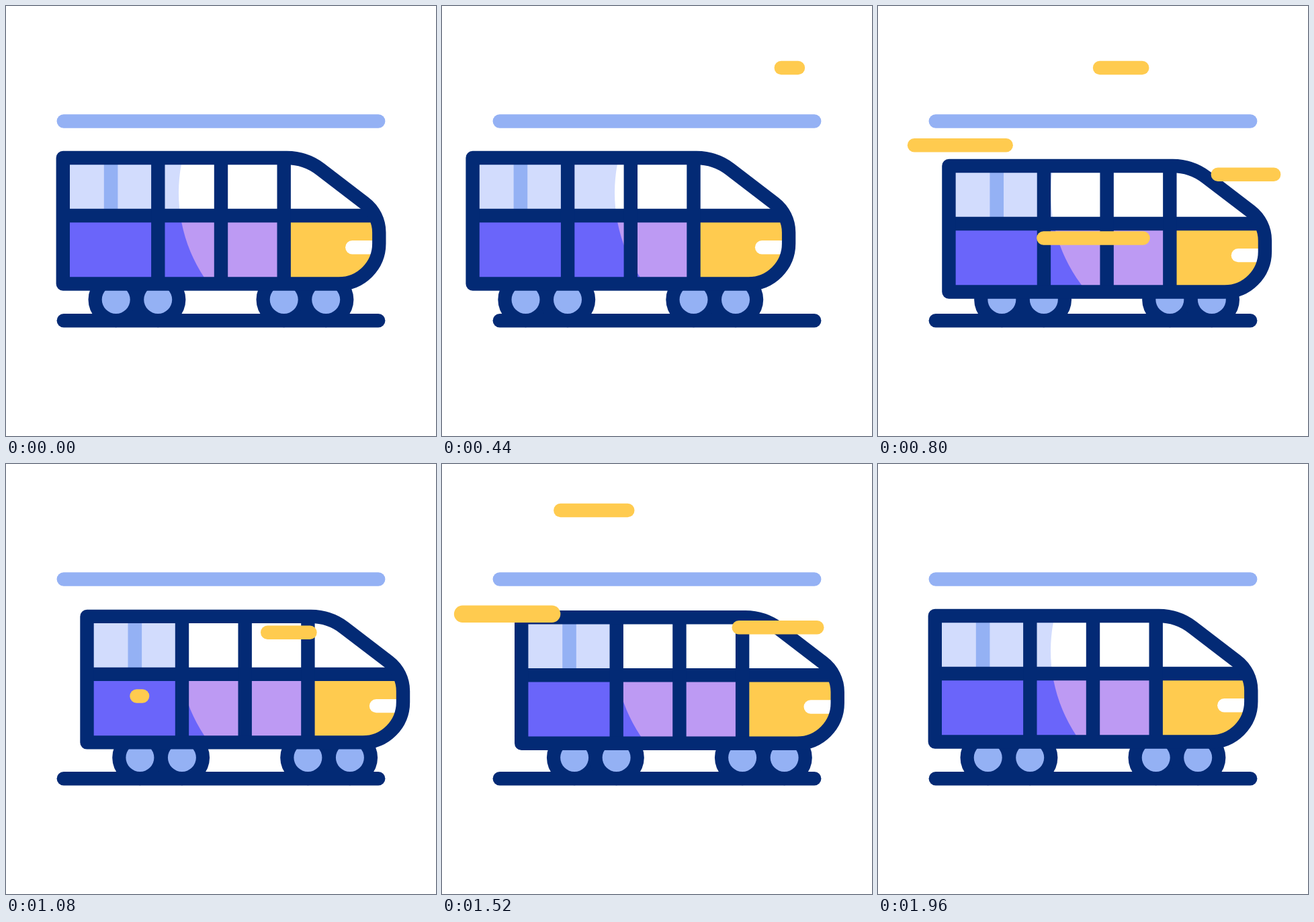
An HTML page with a canvas for the animation above (2 s loop, 640 by 640 pixels).

```html
<!DOCTYPE html>
<html lang="en">
<head>
<meta charset="utf-8">
<title>Train</title>
<style>
  html, body { margin: 0; width: 100%; height: 100%; overflow: hidden; background: #fff; }
  canvas { display: block; width: 640px; height: 640px; }
</style>
</head>
<body>
<canvas id="stage" width="640" height="640"></canvas>
<script>
const ctx = document.getElementById('stage').getContext('2d');
const NAVY = '#032a75', BLUE = '#94b1f4', PALE = '#d2dcfd', VIOLET = '#6a65fa',
      LILAC = '#bd9af3', GOLD = '#ffcb4f', WHITE = '#ffffff';
const LOOP = 2000, STEP = 40, STROKE = 20.4;

// start time, right end, y, length, line width
const streaks = [
  [360, 530, 92, 200, STROKE],
  [440, 254, 207.3, 200, STROKE],
  [560, 394.5, 345.5, 200, STROKE],
  [640, 589.2, 250.7, 200, STROKE],
  [1120, 376.3, 69, 200, STROKE],
  [1160, 225, 223.3, 194.3, 25.6],
  [1320, 558.3, 243.2, 200, STROKE]
];

function ease(t, from, to) {
  const u = Math.min(1, Math.max(0, (t - from) / (to - from)));
  return u * u * (3 - 2 * u);
}

function slide(t) {
  return -40.3 * ease(t, 0, 400) + 76 * ease(t, 400, 960) - 35.7 * ease(t, 1440, 1960);
}

// two dips of the car body on its springs
function dip(t) {
  const start = 472, period = 562, half = period / 2;
  if (t < start || t > start + 2 * period) return 0;
  const p = (t - start) % period;
  return 12.9 * (p < half ? ease(p, 0, half) : 1 - ease(p, half, period));
}

function line(x1, y1, x2, y2, color, width = STROKE, cap = 'round') {
  ctx.beginPath();
  ctx.moveTo(x1, y1);
  ctx.lineTo(x2, y2);
  ctx.strokeStyle = color;
  ctx.lineWidth = width;
  ctx.lineCap = cap;
  ctx.stroke();
}

function rect(x, y, w, h, color) {
  ctx.fillStyle = color;
  ctx.fillRect(x, y, w, h);
}

function disc(x, y, r, color) {
  ctx.beginPath();
  ctx.arc(x, y, r, 0, 2 * Math.PI);
  ctx.fillStyle = color;
  ctx.fill();
}

function hull() {
  const p = new Path2D();
  p.moveTo(84.8, 226);
  p.lineTo(418, 226);
  p.arc(418, 308, 82, -Math.PI / 2, -0.918);
  p.arc(500.3, 337, 55, -0.918, 0);
  p.lineTo(555.3, 353.5);
  p.arc(495.3, 353.5, 60, 0, Math.PI / 2);
  p.lineTo(84.8, 413.5);
  p.closePath();
  return p;
}
const body = hull();

function drawWheels(dx) {
  const xs = [163.7, 226.2, 413.7, 476.2];
  xs.forEach(x => disc(x + dx, 437, 41.2, NAVY));
  xs.forEach(x => disc(x + dx, 437, 21, BLUE));
}

function drawBody(dx, dy) {
  ctx.save();
  ctx.translate(dx, dy);
  ctx.save();
  ctx.clip(body);
  rect(84, 226, 480, 86, PALE);
  rect(84, 312, 480, 102, VIOLET);

  // the lit area stays fixed on the stage
  ctx.save();
  ctx.beginPath();
  ctx.arc(485 - dx, 278 - dy, 228, 0, 2 * Math.PI);
  ctx.clip();
  rect(84, 226, 480, 86, WHITE);
  rect(84, 312, 480, 102, LILAC);
  ctx.restore();

  rect(145.8, 226, 20.6, 86, BLUE);
  rect(414, 226, 150, 86, WHITE);
  rect(414, 312, 150, 102, GOLD);
  line(515.3, 359.2, 560, 359.2, WHITE);
  line(84.8, 312, 548, 312, NAVY, STROKE, 'butt');
  [226.3, 320, 413.7].forEach(x => line(x, 226, x, 413.5, NAVY, STROKE, 'butt'));
  ctx.restore();

  ctx.strokeStyle = NAVY;
  ctx.lineWidth = STROKE;
  ctx.lineJoin = 'round';
  ctx.stroke(body);
  ctx.restore();
}

function drawStreaks(t) {
  for (const [start, x, y, len, width] of streaks) {
    const head = ease(t, start, start + 360);
    const tail = ease(t, start + 240, start + 560);
    if (head - tail > 0.001) line(x - len * head, y, x - len * tail, y, GOLD, width);
  }
}

function draw(t) {
  const dx = slide(t);
  rect(0, 0, 640, 640, WHITE);
  line(85.8, 171.5, 554.2, 171.5, BLUE);
  drawWheels(dx);
  line(85.8, 468.3, 554.2, 468.3, NAVY);
  drawBody(dx, dip(t));
  drawStreaks(t);
}

const begin = performance.now();
function tick() {
  const t = (performance.now() - begin) % LOOP;
  draw(Math.floor(t / STEP) * STEP);
  requestAnimationFrame(tick);
}
tick();
</script>
</body>
</html>
```
